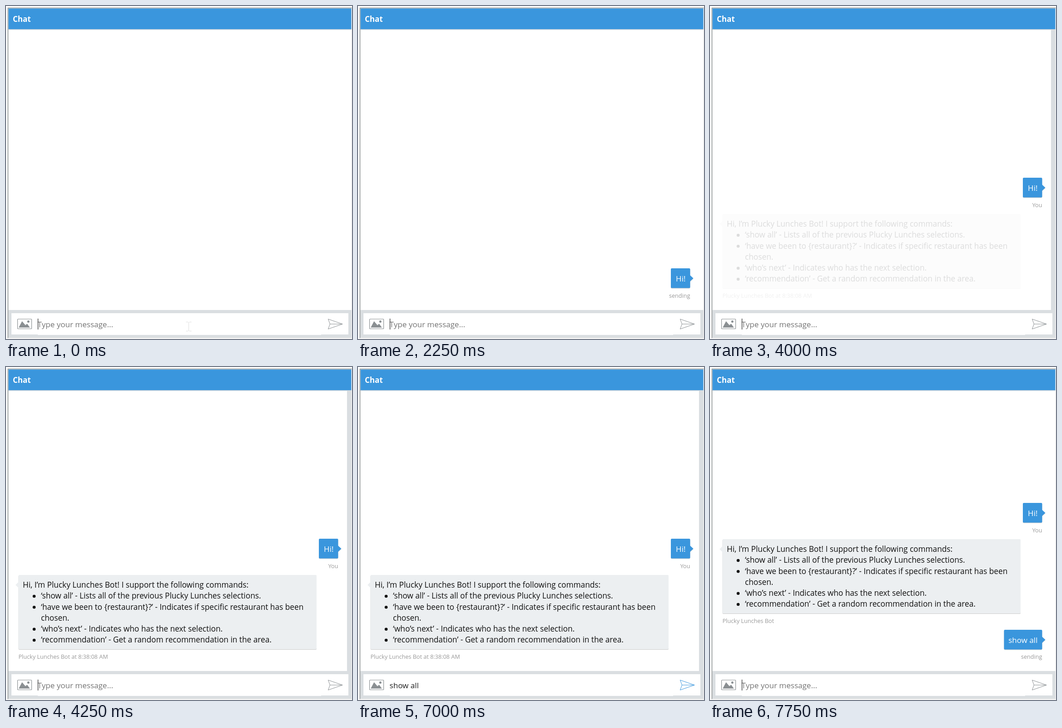
Recreate the animation shown at these times as an HTML page. Size 762 by 735 pixels, loop 8 s.

```html
<!DOCTYPE html>
<html lang="en">
<head>
<meta charset="utf-8">
<title>Chat</title>
<style>
  html, body { margin: 0; width: 100%; height: 100%; overflow: hidden; background: #fff; }
  svg { display: block; font: 17.05px "Open Sans", "Noto Sans", sans-serif; }
  text { white-space: pre; }
  .title { font-size: 17px; font-weight: 700; fill: #fff; }
  .label { font-size: 12.65px; fill: #999; }
  .end { text-anchor: end; }
  .mine { fill: #3a96dd; }
  .mine text { fill: #fff; }
  .bot { fill: #eceff1; font-size: 17.25px; }
  .bot text, .bot circle { fill: #111; }
  .box { filter: drop-shadow(0 1px .5px rgba(0, 0, 0, .2)); }
</style>
</head>
<body>
<svg id="stage" width="762" height="735" viewBox="0 0 762 735">
  <path d="M3.5 734V3.5H762L760.5 5.5H5.5V732Z" fill="#959a9a"/>
  <path d="M762 3.5V734H3.5L5.5 732H760.5V5.5Z" fill="#ebebeb"/>
  <rect x="5.5" y="5.5" width="755" height="666" fill="#fff"/>
  <rect x="5.5" y="5.5" width="755" height="46" fill="#3a96dd"/>
  <rect x="5.5" y="51.5" width="755" height="1" fill="#ccc"/>
  <text class="title" x="15" y="34.5">Chat</text>
  <rect id="strip" x="751" y="52" width="9.5" height="619" fill="#dadee1"/>

  <g id="hello">
    <g class="mine" id="helloBubble"></g>
    <text class="label end" id="helloLabel" x="731.5" y="643.5"></text>
  </g>
  <g id="reply">
    <g class="bot" id="replyBubble"></g>
    <text class="label" id="replyLabel" x="27.5" y="643.5"></text>
  </g>
  <g id="request">
    <g class="mine" id="requestBubble"></g>
    <text class="label end" x="731.5" y="643.5">sending</text>
  </g>

  <rect x="5.5" y="671" width="755" height="61" fill="#dadee1"/>
  <path d="M12 678H754V725H694V726H70V725H12Z" fill="#fff"/>
  <g fill="#8a8f92">
    <rect x="25.5" y="691" width="31" height="21.5" rx="1" fill="none" stroke="#8a8f92" stroke-width="1.2"/>
    <path d="M28 709.8L35.3 695.8L42.8 704.4L46.5 701.2L52.7 709.8Z"/>
    <circle cx="49.2" cy="696.5" r="2.5"/>
  </g>
  <path id="send" d="M709.5 691L741 702L709.5 713L713.5 702ZM713.5 702H741" fill="none" stroke-width="1" stroke-linejoin="round"/>
  <text id="hint" x="69.6" y="709" fill="#757575">Type your message...</text>
  <text id="typed" x="69.6" y="709" fill="#222"></text>
  <rect id="caret" y="690" width="1" height="24" fill="#000"/>
  <path id="pointer" d="M396.5 697.5H400.5L402.5 699L404.5 697.5H408.5M402.5 699V716M396.5 717.5H400.5L402.5 716L404.5 717.5H408.5" fill="none" stroke="#dedede"/>
</svg>
<script>
const LOOP = 8000, FAINT = 0.14;
const BOT = "Plucky Lunches";
const el = {};
document.querySelectorAll("svg [id]").forEach(node => el[node.id] = node);

// Each table lists [start time, value]; a value holds until the next start.
const typedSteps = [[0, ""], [1250, "H"], [1750, "Hi!"], [2000, ""], [5750, "s"],
  [6000, "show"], [6250, "show al"], [6500, "show all"], [7500, ""]];
const caretSteps = [[0, 1], [750, 0], [1250, 1], [2500, 0], [3000, 1], [3500, 0],
  [4000, 1], [4750, 0], [5250, 1], [7000, 0], [7500, 1]];
const helloSteps = [[0, 0], [2000, FAINT], [2250, 1]];
const replySteps = [[0, 0], [4000, FAINT], [4250, 1]];
const requestSteps = [[0, 0], [7500, FAINT], [7750, 1]];
const helloShift = [[0, 0], [4000, -200], [7500, -279]];
const replyShift = [[0, 0], [7500, -79]];
const stripSteps = [[0, 0], [4000, 1], [7500, 0]];
const pointerSteps = [[0, 1], [250, 0]];
const helloLabels = [[0, "sending"], [3500, "You at 8:38:10 AM"], [4000, "You"]];
const replyLabels = [[0, BOT + " Bot at 8:38:08 AM"], [7500, BOT + " Bot"]];

const at = (steps, time) => steps.findLast(([start]) => start <= time)[1];

function myBubble(left, top, text) {
  const mid = top + 22;
  return `<g class="box"><rect x="${left}" y="${top}" width="${731.5 - left}" height="43.5" rx="2"/>
    <path d="M731 ${mid - 7}L738.5 ${mid}L731 ${mid + 7}Z"/></g>
    <text class="end" x="721.5" y="${mid + 7}">${text}</text>`;
}

function botBubble() {
  const line = (text, x, row) => `<text x="${x}" y="${487 + row * 24.25}">${text}</text>`;
  const items = [
    [1, "‘show all’ - Lists all of the previous " + BOT + " selections."],
    [2, "‘have we been to {restaurant}?’ - Indicates if specific restaurant has been"],
    [4, "‘who’s next’ - Indicates who has the next selection."],
    [5, "‘recommendation’ - Get a random recommendation in the area."]
  ];
  return `<g class="box"><rect x="27.5" y="459" width="656.5" height="164" rx="2"/></g>
    <path d="M28 474L21 481L28 488Z"/>` +
    line(`Hi, I’m ${BOT} Bot! I support the following commands:`, 37, 0) +
    line("chosen.", 77, 3) +
    items.map(([row, text]) =>
      `<circle cx="62" cy="${481.7 + row * 24.25}" r="3.3"/>` + line(text, 77, row)).join("");
}

el.helloBubble.innerHTML = myBubble(689, 579, "Hi!");
el.requestBubble.innerHTML = myBubble(647.5, 580, "show all");
el.replyBubble.innerHTML = botBubble();

function setText(node, text) {
  if (node.textContent !== text) node.textContent = text;
}

function place(node, opacity, shift = 0) {
  node.setAttribute("opacity", opacity);
  node.setAttribute("transform", `translate(0 ${shift})`);
}

function draw(time) {
  const typed = at(typedSteps, time);
  setText(el.typed, typed);
  setText(el.helloLabel, at(helloLabels, time));
  setText(el.replyLabel, at(replyLabels, time));
  place(el.hello, at(helloSteps, time), at(helloShift, time));
  place(el.reply, at(replySteps, time), at(replyShift, time));
  place(el.request, at(requestSteps, time));
  el.strip.setAttribute("opacity", at(stripSteps, time));
  el.pointer.setAttribute("opacity", at(pointerSteps, time));
  el.hint.setAttribute("opacity", typed ? 0 : 1);
  el.send.setAttribute("stroke", typed ? "#3a96dd" : "#8a8f92");
  el.caret.setAttribute("opacity", at(caretSteps, time));
  el.caret.setAttribute("x", 70 + (typed ? Math.round(el.typed.getComputedTextLength()) : 0));
}

const start = performance.now();
function tick(now) {
  draw(Math.max(0, now - start) % LOOP);
  requestAnimationFrame(tick);
}
draw(0);
requestAnimationFrame(tick);
</script>
</body>
</html>
```
